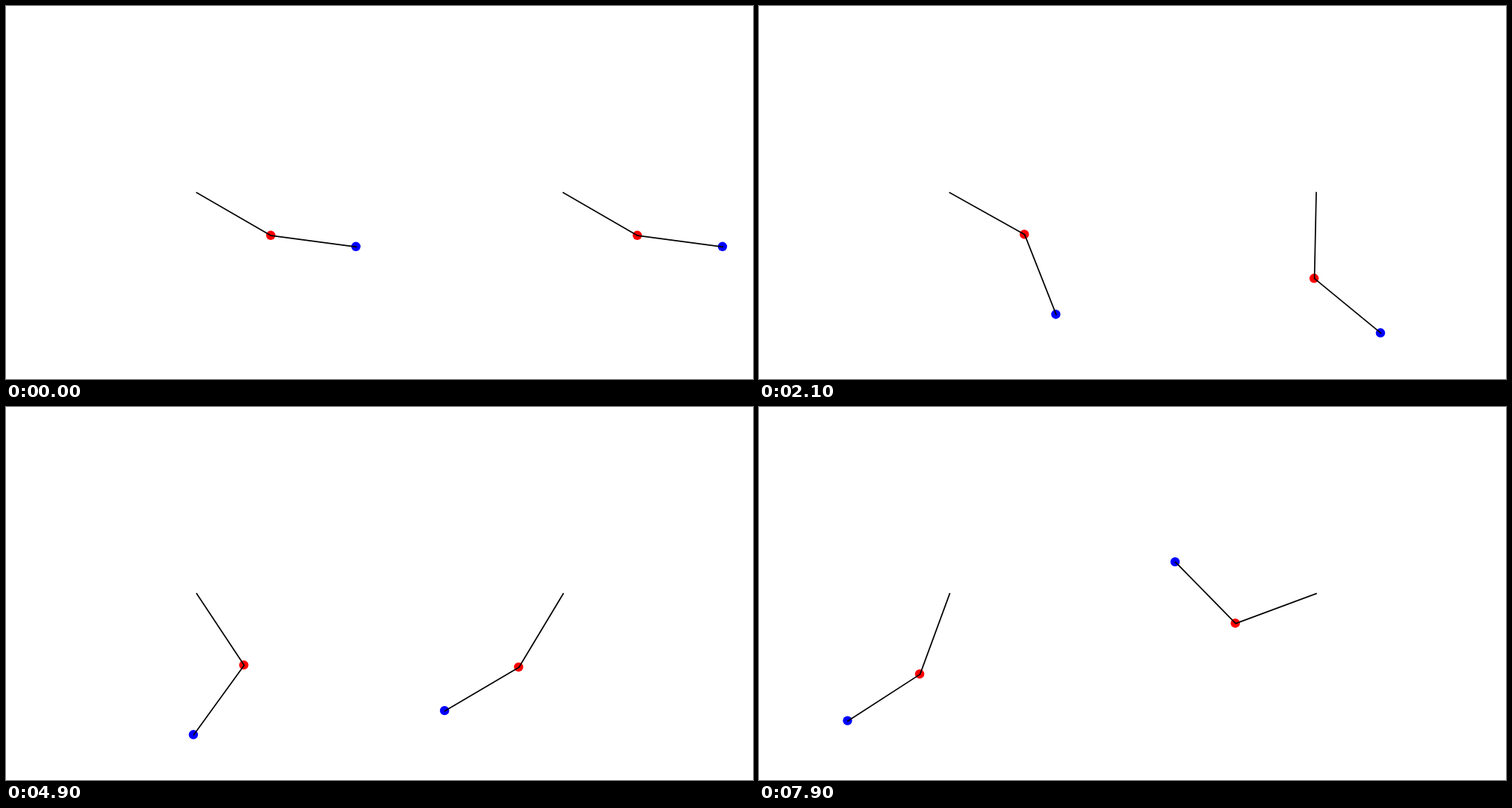
An HTML page with a canvas for the animation above (8 s loop, 1000 by 499 pixels).

```html
<!DOCTYPE html>
<html lang="en">
<head>
<meta charset="utf-8">
<title>Two double pendulums</title>
<style>
  html, body { margin: 0; height: 100%; overflow: hidden; background: #fff; }
  canvas { display: block; }
</style>
</head>
<body>
<canvas id="stage" width="1000" height="499"></canvas>
<script>
const ctx = document.getElementById("stage").getContext("2d");
const FRAMES = 80, STEP = 100;
const ARM = 115, DOT = 6.2, PIVOT_Y = 249.7, LEFT_X = 255.3, RIGHT_X = 746;
const RAD = Math.PI / 180;
const START = [60, 82.5];

// Left: equal masses, no gravity, only the lower arm is set moving.
function simulateFree() {
  let [a, b] = START.map(angle => angle * RAD);
  let va = 0, vb = -0.5;
  const substeps = 200, dt = STEP / 1000 / substeps;
  const poses = [];
  for (let n = 0; n < FRAMES * substeps; n++) {
    if (n % substeps === 0) poses.push([a, b]);
    const s = Math.sin(a - b), c = Math.cos(a - b);
    const accA = -s * (vb * vb + c * va * va) / (2 - c * c);
    const accB = s * va * va - c * accA;
    va += accA * dt;
    vb += accB * dt;
    a += va * dt;
    b += vb * dt;
  }
  return poses;
}

// Right: a wandering path through a few poses [seconds, upper, lower], in degrees.
const wander = [
  [0, ...START], [0.8, 33.3, 87], [2.1, -1.2, 50.6], [2.7, 18, 2], [3.6, 2, -33],
  [4, -22, -26], [5.9, -22, -118], [7.1, -51, -145.3], [7.9, -69.7, -135.5]
];

const slope = (a, b, k) => (b[k] - a[k]) / (b[0] - a[0]);

// Slope at pose i of the parabola through it and its neighbours.
function tangent(i, k) {
  const c = Math.min(Math.max(i, 1), wander.length - 2);
  const [a, b, d] = wander.slice(c - 1, c + 2);
  const before = slope(a, b, k), after = slope(b, d, k);
  const middle = (before * (d[0] - b[0]) + after * (b[0] - a[0])) / (d[0] - a[0]);
  return i < c ? 2 * before - middle : i > c ? 2 * after - middle : middle;
}

function wanderAngle(t, k) {
  let i = 0;
  while (i < wander.length - 2 && t >= wander[i + 1][0]) i++;
  const a = wander[i], b = wander[i + 1];
  const h = b[0] - a[0], u = (t - a[0]) / h, v = 1 - u;
  return RAD * (v * v * (1 + 2 * u) * a[k] + u * u * (1 + 2 * v) * b[k]
    + h * u * v * (v * tangent(i, k) - u * tangent(i + 1, k)));
}

const swing = ([x, y], angle) => [x + ARM * Math.sin(angle), y + ARM * Math.cos(angle)];

function dot([x, y], color) {
  ctx.fillStyle = color;
  ctx.beginPath();
  ctx.arc(x - 0.5, y - 0.4, DOT, 0, 2 * Math.PI);
  ctx.fill();
}

function drawPendulum(pivotX, [upper, lower]) {
  const pivot = [pivotX, PIVOT_Y];
  const joint = swing(pivot, upper);
  const tip = swing(joint, lower);
  dot(joint, "#f00");
  dot(tip, "#00f");
  ctx.beginPath();
  ctx.moveTo(...pivot);
  ctx.lineTo(...joint);
  ctx.lineTo(...tip);
  ctx.stroke();
}

const freePoses = simulateFree();
ctx.lineWidth = 1.7;
ctx.lineCap = "square";
ctx.lineJoin = "round";

function draw() {
  const frame = Math.floor(performance.now() / STEP) % FRAMES;
  const t = frame * STEP / 1000;
  ctx.clearRect(0, 0, 1000, 499);
  drawPendulum(LEFT_X, freePoses[frame]);
  drawPendulum(RIGHT_X, [wanderAngle(t, 1), wanderAngle(t, 2)]);
  requestAnimationFrame(draw);
}
draw();
</script>
</body>
</html>
```
